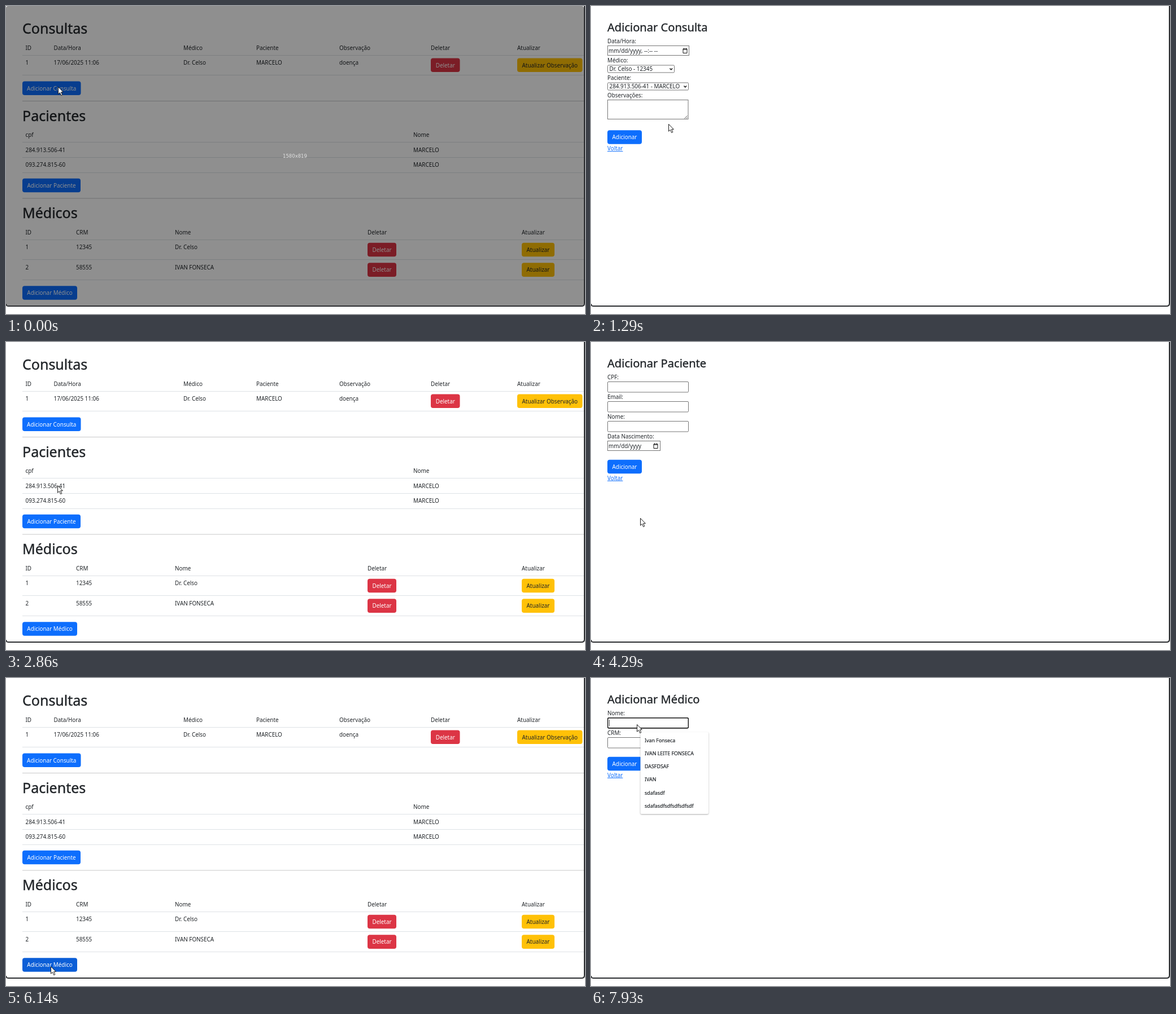
Animation of 1025x546 px, one loop 8 s. Source, as an HTML page:

```html
<!DOCTYPE html>
<html lang="pt-BR">
<head>
<meta charset="utf-8">
<title>Consultas</title>
<style>
html, body { margin: 0; width: 100%; height: 100%; overflow: hidden; background: #fff; }
svg { display: block; width: 1025px; height: 546px; }
text { font: 9.9px "Noto Sans", "Open Sans", sans-serif; fill: #212529; white-space: pre; }
.h1 { font-size: 25px; stroke: #212529; stroke-width: .4px; }
.h2 { font-size: 20.1px; stroke: #212529; stroke-width: .35px; }
.item { font-size: 8.9px; stroke: #212529; stroke-width: .2px; }
.size { font: 8.5px "DejaVu Sans", sans-serif; fill: #e0e0e0; }
.mid { text-anchor: middle; }
.light { fill: #fff; }
.blue { fill: #0d6efd; }
.red { fill: #dc3545; }
.yellow { fill: #ffc107; }
.link { fill: #0d6efd; text-decoration: underline; }
.row { stroke: #dee2e6; }
.rule { stroke: #c7c8c9; }
.field { fill: #fff; stroke: #767676; }
.icon { fill: none; stroke: #111; }

#list, #visit, #patient, #doctor, #shade, #focus, #menu, #cursor { animation: 8s step-end infinite; }
#shade { animation-name: shade; }
#list { animation-name: list; }
#visit { animation-name: visit; }
#patient { animation-name: patient; }
#doctor { animation-name: doctor; }
#focus { animation-name: focus; }
#menu { animation-name: menu; }
#cursor { animation-name: cursor; }
#addVisit { animation: overVisit 8s step-end infinite; }
#addPatient { animation: overPatient 8s step-end infinite; }
#addDoctor { animation: overDoctor 8s step-end infinite; }
#backVisit { animation: overBackVisit 8s step-end infinite; }
#backPatient { animation: overBackPatient 8s step-end infinite; }

@keyframes shade { 0% { opacity: 1 } 5.375%, 100% { opacity: 0 } }
@keyframes list {
  0%, 32.125%, 66.125% { visibility: visible }
  7.125%, 52.625%, 77.625%, 100% { visibility: hidden }
}
@keyframes visit { 0%, 32.125%, 100% { visibility: hidden } 7.125% { visibility: visible } }
@keyframes patient { 0%, 66.125%, 100% { visibility: hidden } 52.625% { visibility: visible } }
@keyframes doctor { 0% { visibility: hidden } 77.625%, 100% { visibility: visible } }
@keyframes focus { 0%, 92% { opacity: 0 } 89.25%, 99.125%, 100% { opacity: 1 } }
@keyframes menu { 0% { opacity: 0 } 99.125%, 100% { opacity: 1 } }
@keyframes overVisit { 0%, 7.125%, 100% { fill: #0d6efd } 6.25% { fill: #0b5ed7 } }
@keyframes overPatient { 0%, 52.625%, 100% { fill: #0d6efd } 41.125% { fill: #0b5ed7 } }
@keyframes overDoctor { 0%, 77.625%, 100% { fill: #0d6efd } 75% { fill: #0b5ed7 } }
@keyframes overBackVisit { 0%, 32.125%, 100% { fill: #0d6efd } 25% { fill: #0a58ca } }
@keyframes overBackPatient { 0%, 66.125%, 100% { fill: #0d6efd } 60.75% { fill: #0a58ca } }

/* The pointer is redrawn about every 70 ms, hence the steps. */
@keyframes cursor {
  0% { transform: translate(92px, 143px) }
  8.875% { transform: translate(93px, 150px) }
  12.5% { transform: translate(105px, 154px); animation-timing-function: steps(2) }
  14.25% { transform: translate(281px, 180px); animation-timing-function: steps(2) }
  16.125% { transform: translate(137px, 209px); animation-timing-function: steps(4) }
  19.625% { transform: translate(72px, 258px) }
  22.375% { transform: translate(68px, 257px); animation-timing-function: steps(5) }
  26.75% { transform: translate(44px, 255px) }
  33.875% { transform: translate(60px, 256px) }
  35.75% { transform: translate(91px, 254px); animation-timing-function: steps(3) }
  38.375% { transform: translate(161px, 280px); animation-timing-function: steps(5) }
  42.875% { transform: translate(87px, 312px) }
  55.375% { transform: translate(95px, 308px); animation-timing-function: steps(3) }
  58% { transform: translate(105px, 275px); animation-timing-function: steps(4) }
  61.625% { transform: translate(45px, 243px) }
  67.875% { transform: translate(48px, 262px); animation-timing-function: steps(5) }
  72.375% { transform: translate(85px, 440px); animation-timing-function: steps(3) }
  75% { transform: translate(80px, 505px); animation-timing-function: steps(2) }
  76.75% { transform: translate(79px, 511px) }
  79.5% { transform: translate(85px, 490px); animation-timing-function: steps(5) }
  83.875% { transform: translate(140px, 220px); animation-timing-function: steps(4) }
  87.5% { transform: translate(150px, 100px); animation-timing-function: steps(2) }
  89.25% { transform: translate(90px, 76px) }
  90.125% { transform: translate(85px, 95px); animation-timing-function: steps(2) }
  92% { transform: translate(70px, 181px); animation-timing-function: steps(2) }
  93.75% { transform: translate(80px, 69px) }
  95.5% { transform: translate(80px, 76px) }
  96.375%, 100% { transform: translate(81px, 82px) }
}
</style>
</head>
<body>
<svg viewBox="0 0 1025 546" xmlns="http://www.w3.org/2000/svg">
  <g id="list"></g>
  <g id="visit"></g>
  <g id="patient"></g>
  <g id="doctor"></g>
  <g id="shade">
    <rect width="1023" height="531" rx="4" opacity=".44"/>
    <text class="size" x="490" y="268.9">1580x819</text>
  </g>
  <path d="M0 528Q.5 532 4 532H1019Q1024 532 1024 527V0" fill="none" stroke="#2b2d30" stroke-width="2"/>
  <path id="cursor" d="M.5 .5V13.2L3.4 10.5L5.7 15.6L7.8 14.6L5.6 9.7H9.4Z" fill="#fff" stroke="#1c1c1c"/>
</svg>
<script>
const DOCTOR = "Dr. Celso", PATIENT = "MARCELO", SECOND = "IVAN FONSECA";
const CPFS = ["284.913.506-41", "093.274.815-60"];

// y is the middle of the capitals
const text = (x, y, s, cls = "", id = "") =>
  `<text id="${id}" class="${cls}" x="${x}" y="${y + 3.7}">${s}</text>`;
const h1 = (y, s) => text(29, y + 5.2, s, "h1");
const h2 = s => text(29, 41, s, "h2");
const line = (y, cls = "row") => `<path class="${cls}" d="M29 ${y}H1023"/>`;
const cells = (y, xs, words) => words.map((w, i) => text(xs[i], y, w)).join("");
const button = (x, y, w, s, color = "blue", id = "") =>
  `<rect id="${id}" class="${color}" x="${x}" y="${y - 12.3}" width="${w}" height="24.6" rx="4"/>` +
  text(x + w / 2, y, s, color === "yellow" ? "mid" : "mid light");
const field = (y, w, h, r = 1.5) =>
  `<rect class="field" x="29.5" y="${y}" width="${w}" height="${h}" rx="${r}"/>`;
const calendar = (x, y) =>
  `<path class="icon" d="M${x} ${y}h7v7.5h-7zM${x} ${y + 1}h7M${x + 1.5} ${y - 1.5}v1.5M${x + 5.5} ${y - 1.5}v1.5"/>`;
const select = (y, w, s) => field(y - 6.5, w, 13) + text(32.5, y, s) +
  `<path class="icon" stroke-width="1.4" d="M${w + 21.5} ${y - 1}l2.3 2.4 2.3-2.4"/>`;
const actions = (y, id = "") => button(29, y, 61, "Adicionar") + text(29, y + 20, "Voltar", "link", id);
const fill = (id, ...parts) => document.getElementById(id).innerHTML = parts.join("");

const visitX = [34.5, 84.5, 314, 443, 590, 752, 905];
const patientX = [34.5, 721];
const doctorX = [34.5, 124, 299, 640, 913];
const doctorRow = (y, words) => cells(y, doctorX, words) +
  button(640, y + 4.3, 51, "Deletar", "red") + button(913, y + 4.3, 58, "Atualizar", "yellow");

fill("list",
  h1(40, "Consultas"),
  cells(74, visitX, ["ID", "Data/Hora", "Médico", "Paciente", "Observação", "Deletar", "Atualizar"]),
  cells(100.5, visitX, ["1", "17/06/2025 11:06", DOCTOR, PATIENT, "doença"]),
  button(752, 104.8, 51.5, "Deletar", "red"),
  button(905, 104.8, 115.5, "Atualizar Observação", "yellow"),
  button(29, 145.8, 103.5, "Adicionar Consulta", "blue", "addVisit"),
  h1(195, "Pacientes"),
  cells(228.5, patientX, ["cpf", "Nome"]),
  CPFS.map((cpf, i) => cells(255 + i * 26.7, patientX, [cpf, PATIENT])).join(""),
  button(29, 318, 103, "Adicionar Paciente", "blue", "addPatient"),
  h1(367, "Médicos"),
  cells(401, doctorX, ["ID", "CRM", "Nome", "Deletar", "Atualizar"]),
  doctorRow(427.7, ["1", "12345", DOCTOR]),
  doctorRow(463.3, ["2", "58555", SECOND]),
  button(29, 508.5, 97, "Adicionar Médico", "blue", "addDoctor"),
  [87.5, 122.5, 241.5, 268.5, 295.5, 414.5, 449.5, 485.5].map(y => line(y)).join(""),
  line(168.5, "rule"), line(341, "rule")
);

fill("visit",
  h2("Adicionar Consulta"),
  text(29, 62, "Data/Hora:"), field(70.5, 144, 17, 0), text(31, 79, "mm/dd/yyyy, --:-- --"), calendar(163, 76),
  text(29, 96, "Médico:"), select(111.5, 118, `${DOCTOR} - 12345`),
  text(29, 127, "Paciente:"), select(142.5, 143, `${CPFS[0]} - ${PATIENT}`),
  text(29, 158, "Observações:"), field(166.5, 142.5, 34, 0),
  `<path class="icon" stroke-width=".7" d="M165.5 199.5l5-5M168.5 199.5l2-2"/>`,
  actions(232.5, "backVisit")
);

fill("patient",
  h2("Adicionar Paciente"),
  ["CPF:", "Email:", "Nome:"].map((s, i) => text(29, 62 + 35 * i, s) + field(70.5 + 35 * i, 143, 18.5)).join(""),
  text(29, 167, "Data Nascimento:"), field(175.5, 93, 17, 0), text(31, 184, "mm/dd/yyyy"), calendar(111, 181),
  actions(221, "backPatient")
);

const names = ["Ivan Fonseca", SECOND.replace(" ", " LEITE "), "DASFDSAF", "IVAN", "sdafasdf", "sdafasdfsdfsdfsdfsdf"];
fill("doctor",
  h2("Adicionar Médico"),
  text(29, 62, "Nome:"), field(70.5, 143, 18.5),
  text(29, 97, "CRM:"), field(105.5, 143, 18.5),
  actions(152),
  `<g id="focus"><rect x="29.7" y="70.7" width="142.6" height="18" rx="2" fill="#fff" stroke="#101010" stroke-width="1.4"/>
   <path d="M32.5 74V85.5" stroke="#555"/></g>`,
  `<g id="menu"><rect x="87.5" y="96" width="120.5" height="145" rx="2" fill="#fff"
   style="filter:drop-shadow(0 1px 1.2px #0005)"/>`,
  names.map((s, i) => text(95, 109.8 + 23.3 * i, s, "item")).join(""), "</g>"
);
</script>
</body>
</html>
```
